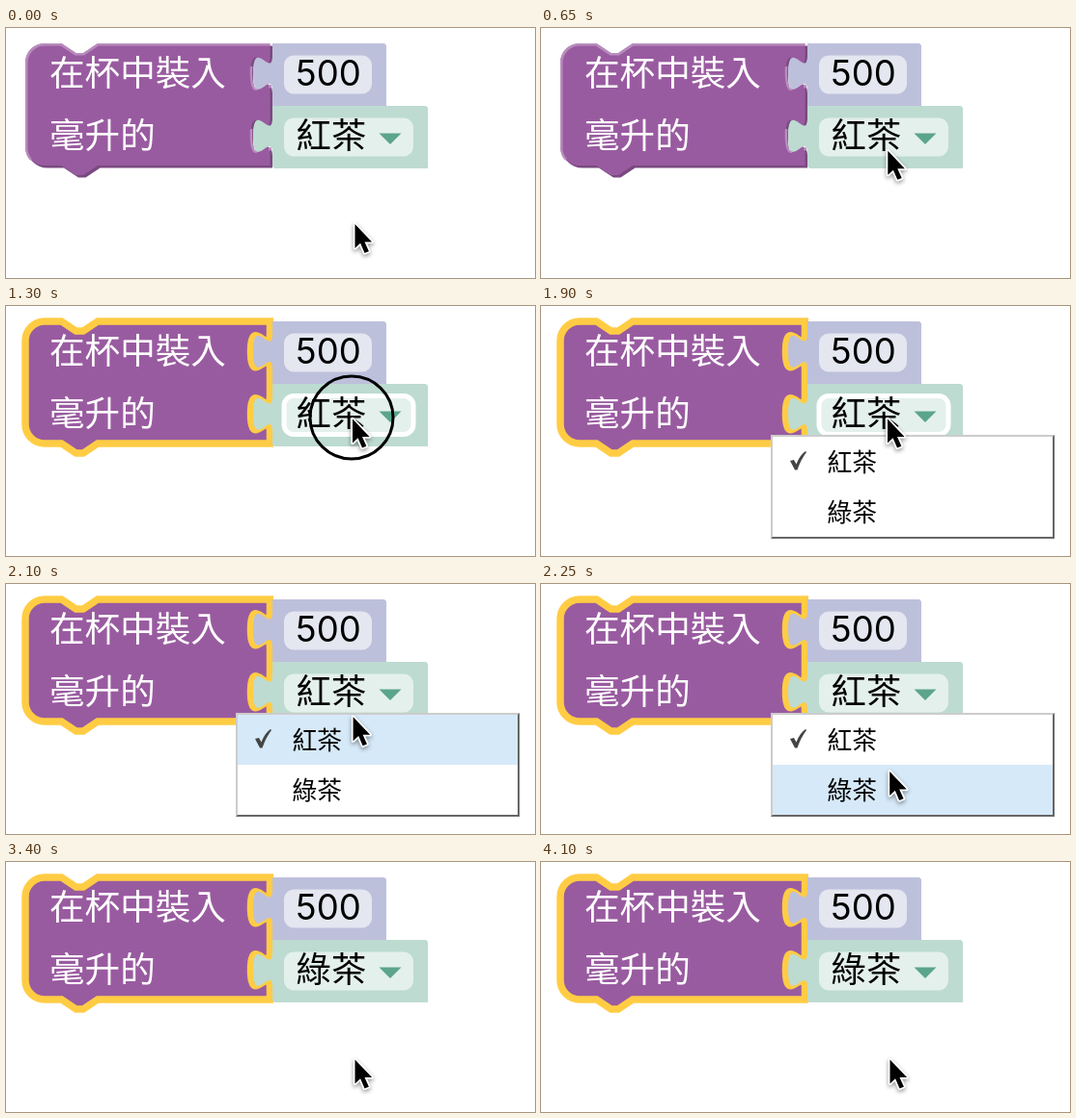
These frames come from a looping animation (548 by 260 pixels, 4.15 s). An HTML page:

```html
<!DOCTYPE html>
<html lang="zh-TW">
<head>
<meta charset="utf-8">
<style>
  html, body { margin: 0; width: 100%; height: 100%; overflow: hidden; background: #fff; }
  svg { display: block; }
  text { font: 36.4px "Noto Sans CJK TC", "Noto Sans CJK", sans-serif; }
  .label { font-size: 36.6px; font-weight: 500; }
  .item { font-size: 25.8px; }
  #cursor { filter: drop-shadow(0 2px 2px rgba(0, 0, 0, .4)); }
</style>
</head>
<body>
<svg width="548" height="260" viewBox="0 0 548 260">
  <defs>
    <path id="body" d="M20 36a20 20 0 0 1 20-20H57.5l15 10h7.5l15-10H273.5
      v12.5c0 25-20-20-20 18.750s20-6.250 20 18.750V93.500c0 25-20-20-20 18.750s20-6.250 20 18.750V143
      H95l-15 10h-7.500l-15-10H40a20 20 0 0 1-20-20z"/>
    <path id="tab" d="M276 28.500c0 25-20-20-20 18.750s20-6.250 20 18.750z"/>
    <path id="shine" d="M254.100 40q-1 25 6 23.750m13.400-4.750v3.500"/>
    <clipPath id="left"><path d="M0 0H277V260H0z"/></clipPath>
  </defs>

  <g id="plain">
    <use href="#body" x="2.5" y="2.5" fill="#7a4980"/>
    <use href="#body" fill="#995ba0"/>
    <g fill="none" stroke="#b88cbd" stroke-width="2.5">
      <path d="M26 137a19 19 0 0 1-4.750-14V36a18.750 18.750 0 0 1 18.750-18.750H57l15 10h8.500l15-10H273"/>
      <use href="#shine"/>
      <use href="#shine" y="65"/>
    </g>
  </g>
  <use id="selected" href="#body" fill="#995ba0" stroke="#fc4" stroke-width="7.5" clip-path="url(#left)"/>

  <g fill="#bdc0db"><use href="#tab"/><path d="M276 16H392l2 2V81H276z"/></g>
  <g fill="#bddbd1"><use href="#tab" y="65"/><path d="M276 81H435l2 2V146H278l-2-2z"/></g>
  <g fill="#fff" fill-opacity=".6">
    <rect x="288" y="28.5" width="91" height="40" rx="10"/>
    <rect id="field" x="288" y="93.5" width="134" height="40" rx="10" stroke="#fff"/>
  </g>
  <path d="M386.5 109.5h23l-11.5 11.5z" fill="#5ba58c"/>
  <g fill="#fff">
    <text class="label" x="45" y="60.2">在杯中裝入</text>
    <text class="label" x="45" y="125.2">毫升的</text>
  </g>
  <text x="300" y="60.2" style="font-family:Inter,sans-serif;font-size:36.5px">500</text>
  <text id="value" x="300.5" y="125.2"></text>

  <g id="menu">
    <path d="M238 134H532V242H238z" fill="#ccc"/>
    <path d="M532 134V242H238l2-2H530V136z" fill="#666"/>
    <path d="M240 136H530V240H240z" fill="#fff"/>
    <path id="hot" d="M240 136h290v52h-290z" fill="#d6e9f8"/>
    <path d="M258 161l4-1 2.5 4.5Q268 155 274 151l1 1Q269 160 265.5 170.5h-2.5z" fill="#444"/>
    <text class="item" x="296.5" y="172">紅茶</text>
    <text class="item" x="296.5" y="224">綠茶</text>
  </g>

  <circle id="ring" r="43" fill="none" stroke="#000" stroke-width="3"/>
  <path id="cursor" d="M0 0V25l5.6-5.2 4.4 10.2 4.4-1.8-4.4-9.8h7.6z" stroke="#fff" stroke-width="3.5"
    stroke-linejoin="round" paint-order="stroke"/>
</svg>
<script>
  const LOOP = 4150, PRESS1 = 1250, OPEN = 1400, PRESS2 = 2950, CLOSE = 3100;
  const $ = id => document.getElementById(id);
  const show = (id, on) => $(id).style.display = on ? '' : 'none';
  const clamp = v => Math.min(1, Math.max(0, v));
  const glide = (t, start) => {
    const k = clamp((t - start) / 320);
    return k * k * (3 - 2 * k);
  };
  // Ring is solid while pressed, then fades after release.
  const ringAlpha = (t, down, up) => t < down ? 0 : clamp(1 - (t - up) / 100);

  function draw(now) {
    const t = now % LOOP;
    const up = glide(t, 400), down = glide(t, 2000);
    const x = 361.5 - 2.5 * up + 2.5 * down;
    const y = 204 - 86.5 * up + 88 * down;
    const open = t >= OPEN && t < CLOSE;

    $('cursor').setAttribute('transform', `translate(${x} ${y})`);
    $('ring').setAttribute('transform', `translate(${x - 1} ${y - 1.5})`);
    $('ring').style.opacity = t < 2000 ? ringAlpha(t, PRESS1, OPEN) : ringAlpha(t, PRESS2, CLOSE);

    show('plain', t < PRESS1);
    show('selected', t >= PRESS1);
    show('menu', open);
    show('hot', open && y > 136);
    $('hot').setAttribute('transform', `translate(0 ${y > 188 ? 52 : 0})`);
    $('field').setAttribute('stroke-width', t > 680 && y < 134 ? 5 : 0);
    $('value').textContent = t < CLOSE ? '紅茶' : '綠茶';
    requestAnimationFrame(draw);
  }
  draw(0);
</script>
</body>
</html>
```
